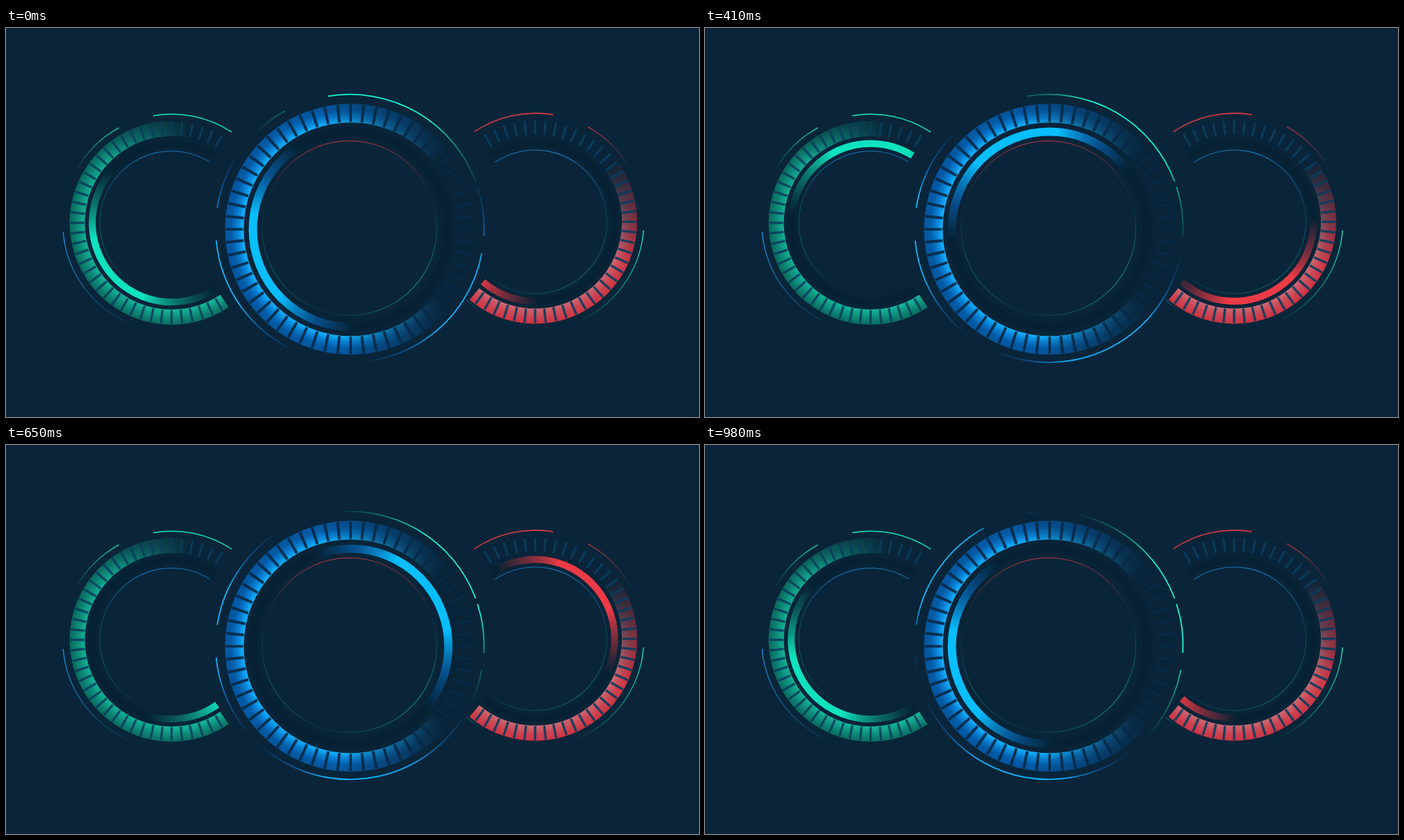
An HTML page with a canvas for the animation above (1580 ms loop, 998 by 561 pixels).

```html
<!DOCTYPE html>
<html>
<head>
<meta charset="utf-8">
<style>
html, body { margin: 0; height: 100%; overflow: hidden; background: #0a2539; }
canvas { display: block; }
</style>
</head>
<body>
<canvas id="stage" width="998" height="561"></canvas>
<script>
const W = 998, H = 561, LOOP = 1580;
const ctx = document.getElementById('stage').getContext('2d');
const rad = deg => deg * Math.PI / 180;

function layer() {
  const c = document.createElement('canvas');
  c.width = W;
  c.height = H;
  return c.getContext('2d');
}

// Angular gradient; stops are [degrees, rgb, alpha], clockwise from the right.
function conic(g, x, y, stops) {
  const first = stops[0][0];
  const grad = g.createConicGradient(rad(first), x, y);
  for (const [deg, rgb, a] of stops) grad.addColorStop((deg - first) / 360, `rgba(${rgb},${a})`);
  return grad;
}

function arc(g, x, y, r, width, from, to, style) {
  g.beginPath();
  g.arc(x, y, r, rad(from), rad(to));
  g.lineWidth = width;
  g.strokeStyle = style;
  g.stroke();
}

// Thin arc whose opacity runs through evenly spaced alphas.
function line(g, d, r, width, rgb, from, to, ...alphas) {
  const step = (to - from) / (alphas.length - 1);
  arc(g, d.x, d.y, r, width, from, to, conic(g, d.x, d.y, alphas.map((a, i) => [from + i * step, rgb, a])));
}

// Glow along an arc, full around `peak`, fading out `half` degrees to each side.
function glow(x, y, r, width, from, to, peak, half, core, edge) {
  const stops = [[-1, edge, 0], [-.7, edge, .55], [-.35, core, 1],
                 [.35, core, 1], [.7, edge, .55], [1, edge, 0]];
  arc(ctx, x, y, r, width, from, to,
    conic(ctx, x, y, stops.map(([f, rgb, a]) => [peak + f * half, rgb, a])));
}

// Segmented band: radial colour, angular fade, dark ticks and the groove inside it.
function band(g, d) {
  const { x, y, k, from, to } = d;
  const r0 = 154 * k, r1 = 181 * k;
  const b = layer();
  const fill = b.createRadialGradient(x, y, r0, x, y, r1);
  d.colors.forEach((c, i) => fill.addColorStop(i / (d.colors.length - 1), c));
  arc(b, x, y, (r0 + r1) / 2, r1 - r0, from, to, fill);
  b.globalCompositeOperation = 'destination-in';
  b.fillStyle = conic(b, x, y, d.fade.map(([deg, a]) => [deg, '0,0,0', a]));
  b.fillRect(0, 0, W, H);
  g.drawImage(b.canvas, 0, 0);

  g.save();
  g.shadowColor = d.tick;
  g.shadowBlur = 1.5;
  g.strokeStyle = d.tick;
  g.lineWidth = 3.5 * k;
  for (let a = Math.ceil(from / 6) * 6; a < Math.min(to, from + 359); a += 6) {
    const c = Math.cos(rad(a)), s = Math.sin(rad(a));
    g.beginPath();
    g.moveTo(x + c * (r0 + 1), y + s * (r0 + 1));
    g.lineTo(x + c * (r1 - 1), y + s * (r1 - 1));
    g.stroke();
  }
  g.shadowColor = 'rgba(4,32,48,.5)';
  g.shadowBlur = 6;
  arc(g, x, y, 141 * k, 12 * k, from, to, 'rgba(4,32,48,.5)');
  g.restore();
}

const GREEN = '22,236,200', BLUE = '26,140,215', RED = '225,58,72', TEAL = '20,140,128';
const main = {
  x: 496.3, y: 290.3, k: 1, from: 0, to: 360, tick: 'rgba(9,42,70,.85)',
  colors: ['#12b4ff', '#0a80d4', '#055ca8', '#05559c'],
  fade: [[38, 0], [95, 1], [255, 1], [322, 0]]
};
const left = {
  x: 238.5, y: 281, k: .812, from: 56, to: 303, tick: 'rgba(11,61,92,.8)',
  colors: ['#14bd9e', '#0f927e', '#0b6d60'],
  fade: [[50, 1], [225, .9], [282, 0], [409, 0]]
};
const right = {
  x: 762, y: 279.5, k: .812, from: 236, to: 490, tick: 'rgba(11,61,94,.85)',
  colors: ['#cb6a74', '#cd4653', '#cf3342'],
  fade: [[322, 0], [385, 1], [491, 1], [492, 0]]
};

function drawStill() {
  const g = layer();
  g.fillStyle = '#0a2539';
  g.fillRect(0, 0, W, H);
  [left, right, main].forEach(d => band(g, d));

  line(g, left, 156.8, 1.5, GREEN, 260.3, 303.5, 1, .85);
  line(g, left, 156.8, 1.3, GREEN, 208, 241, 0, .9);
  line(g, left, 156.8, 1.4, BLUE, 108, 175.2, 0, 1);
  line(g, left, 103.5, 1.1, TEAL, 115, 205, 0, .5, .4);
  line(g, left, 103.5, 1.1, BLUE, 205, 302, .35, .85, .65);

  line(g, right, 156.6, 1.5, RED, 236, 279.5, .9, 1);
  line(g, right, 156.6, 1.3, RED, 299, 332, .9, 0);
  line(g, right, 156.6, 1.4, GREEN, 4.6, 68, 1, 0);
  line(g, right, 150, 1, GREEN, 122, 131, 0, .45);
  line(g, right, 103.5, 1.1, BLUE, 236, 350, .7, .85, .2);
  line(g, right, 103.5, 1.1, TEAL, 350, 490, .3, .65, .1);

  const inner = { x: 494.7, y: 288.5 };
  line(g, inner, 125.8, 1.1, RED, -165, -20, 0, .9, 0);
  line(g, inner, 125.8, 1.1, TEAL, -20, 100, 0, 1, .1);
  line(g, inner, 125.8, 1.1, TEAL, 100, 200, .1, .5, 0);
  return g.canvas;
}

// 30 ms steps after a pause; the last ten advance twice as far, 38 in all.
function progress(t) {
  const step = t < 170 ? 0 : Math.min(28, Math.floor((t - 170) / 30) + 1);
  return step + Math.max(0, step - 18);
}

const RIM = [[-99.3, -20.5], [-18, 3.2], [10.6, 174.8], [188.8, 241.1]];
const still = drawStill();

function draw(t) {
  const p = progress(t), whole = p / 38;
  const easeOut = 1 - (1 - whole) ** 2;
  const leftTurn = 360 * Math.min(1, p / 25);
  const rightTurn = 360 * Math.min(1, p / 26) ** 1.3;
  ctx.drawImage(still, 0, 0);

  glow(main.x, main.y, 140.8, 12, 0, 360, 163 + 360 * whole, 75, '8,190,252', '8,115,208');
  glow(left.x, left.y, 114.3, 10, 55, 302, 140 + leftTurn, 82, '14,226,190', '14,160,136');
  glow(right.x, right.y, 114.5, 10, 236, 491, 160 - rightTurn, 72, '236,58,70', '185,52,66');

  for (const [from, to] of RIM) {
    const rim = (...a) => glow(495.2, 289, 193.3, 1.8, from, to, ...a);
    rim(-75 + 58 * easeOut, 61, '22,245,212', '20,175,145');
    rim(32 + 72 * easeOut, 52, '16,176,250', '14,105,190');
    rim(164 + 53 * whole, 50, '16,184,252', '14,110,200');
  }
}

const start = performance.now();
function loop(now) {
  draw(Math.max(0, now - start) % LOOP);
  requestAnimationFrame(loop);
}
loop(start);
</script>
</body>
</html>
```
